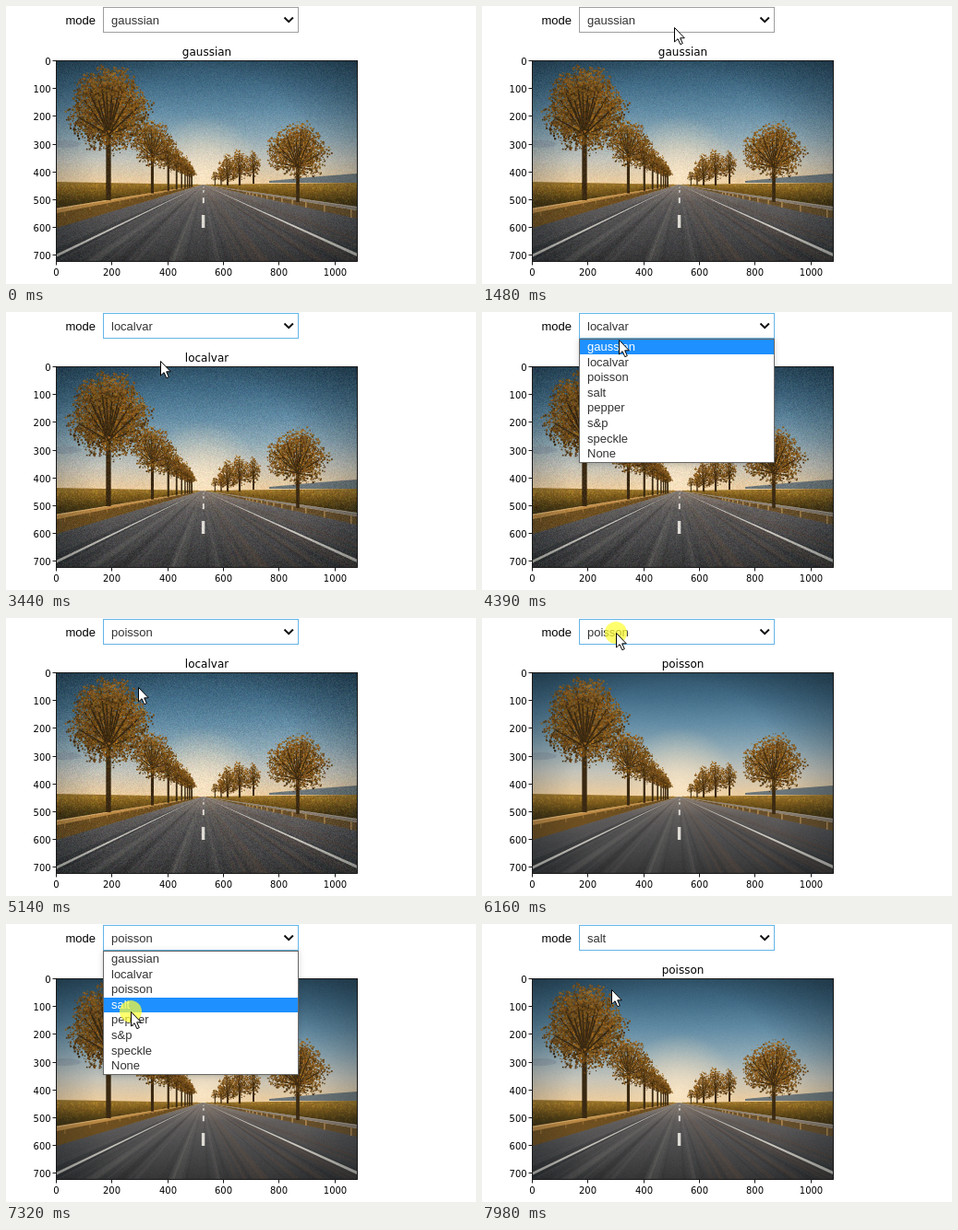
An HTML page with a canvas that plays this animation: 509 by 302 pixels, repeating every 8000 ms.

```html
<!DOCTYPE html>
<html lang="en">
<head>
<meta charset="utf-8">
<title>Noise mode</title>
<style>
html, body { margin: 0; width: 100%; height: 100%; overflow: hidden; background: #fff; }
canvas { position: absolute; left: 55px; top: 60px; visibility: hidden; }
svg { position: absolute; left: 0; top: 0; }
.ui { font: 13px "Liberation Sans", Arial, sans-serif; fill: #333; }
.label { fill: #000; }
.plot { font: 10px "DejaVu Sans", sans-serif; fill: #000; }
#title { font-size: 12px; text-anchor: middle; }
#menu { filter: drop-shadow(0 1px 3px rgba(0, 0, 0, .18)); }
</style>
</head>
<body>
<svg id="stage" width="509" height="302" viewBox="0 0 509 302">
  <text class="ui label" x="64.5" y="20">mode</text>
  <rect id="box" x="105.5" y="1.5" width="211" height="27" fill="#fff" stroke="#9e9e9e"/>
  <text id="value" class="ui" x="114" y="20"></text>
  <path d="M301.5 12.5l4.7 4.7 4.7-4.7" fill="none" stroke="#111" stroke-width="2"/>
  <g id="axes" class="plot">
    <rect x="54.5" y="59.5" width="326" height="218" fill="none" stroke="#000" stroke-width=".9"/>
    <text id="title" x="217.5" y="54"></text>
  </g>
  <g id="menu">
    <rect x="105.5" y="29.5" width="211" height="134" fill="#fff" stroke="#686868"/>
    <rect id="hot" x="106" width="210" height="16" fill="#1e90ff"/>
  </g>
  <circle id="halo" r="12" fill="#ffff30" fill-opacity=".7"/>
  <path id="cursor" d="M.5 .5V16l3.6-3.3 2.7 6 2.5-1.1-2.6-5.8h4.6z" fill="#fff" stroke="#000" stroke-width="1"/>
</svg>
<script>
const $ = id => document.getElementById(id);
const LOOP = 8000, STEP = 69, HOLD = 130;
const MODES = ['gaussian', 'localvar', 'poisson', 'salt', 'pepper', 's&p', 'speckle', 'None'];
const PRESSES = [1680, 2770, 4060, 5000, 6160, 7320]; // open, pick, open, pick ...
const REDRAWS = [3440, 5960];
// start, steps, x, y
const MOVES = [
  [70, 1, 411, 295], [490, 2, 409, 293], [1070, 7, 206, 20], [2140, 6, 167, 53],
  [3570, 4, 150, 7], [4390, 6, 143, 75], [5270, 9, 146, 20], [5960, 2, 145, 16],
  [6640, 6, 135, 95], [7910, 2, 140, 71]
];

function seeded(seed) {
  return () => {
    seed = (seed + 0x6D2B79F5) | 0;
    let v = Math.imul(seed ^ (seed >>> 15), 1 | seed);
    v ^= v + Math.imul(v ^ (v >>> 7), 61 | v);
    return ((v ^ (v >>> 14)) >>> 0) / 4294967296;
  };
}

// ---------- picture ----------
const L = 55, T = 60, W = 325, H = 217, R = L + W, B = T + H;
const VX = 213, VY = 194; // vanishing point

function newCanvas() {
  const c = document.createElement('canvas');
  c.width = W;
  c.height = H;
  return c;
}

function drawScene() {
  const c = newCanvas(), g = c.getContext('2d'), rnd = seeded(7);
  g.translate(-L, -T);

  const blend = (grad, ...stops) => {
    stops.forEach(([at, col]) => grad.addColorStop(at, col));
    return grad;
  };
  const down = (y1, y2, ...cols) =>
    blend(g.createLinearGradient(0, y1, 0, y2), ...cols.map((col, i) => [i / (cols.length - 1), col]));
  const glow = (r1, r2, from, to) =>
    blend(g.createRadialGradient(VX, VY - 10, r1, VX, VY - 10, r2), [0, from], [1, to]);
  // a wedge that opens from the vanishing point
  const fan = (fill, ...pts) => {
    g.fillStyle = fill;
    g.beginPath();
    g.moveTo(VX, VY);
    for (let i = 0; i < pts.length; i += 2) g.lineTo(pts[i], pts[i + 1]);
    g.fill();
  };

  // sky
  g.fillStyle = down(T, VY, '#2f5268', '#436d88', '#618ba4', '#8ca8b5', '#c4c3b9', '#efcd9c');
  g.fillRect(L, T, W, H);
  g.fillStyle = glow(2, 65, 'rgba(255,236,205,.75)', 'rgba(255,230,190,0)');
  g.fillRect(L, T, W, H);
  g.fillStyle = 'rgba(115,125,145,.3)';
  g.beginPath();
  g.ellipse(64, 150, 17, 4, 0, 0, 7);
  g.fill();

  // far hills and crops
  g.fillStyle = '#6c7679';
  g.beginPath();
  [[285, 190], [340, 185], [R, 182], [R, 192], [285, 192]].forEach(p => g.lineTo(...p));
  g.fill();
  const crops = down(190, 222, '#a07a30', '#7c5a1c', '#4a3a14', '#3b2d12');
  fan(crops, L, 191, L, 222);
  fan(crops, R, 192, R, 220);
  for (let i = 0; i < 900; i++) {
    const side = rnd() < .5 ? -1 : 1, d = Math.sqrt(rnd()), v = rnd();
    g.fillStyle = `hsla(${36 + rnd() * 10},60%,${40 - 26 * v + 10 * rnd()}%,.6)`;
    g.fillRect(VX + side * 165 * d, VY - 1 + 25 * d * v, 1 + rnd(), 1 + rnd());
  }

  // road with streaks along the lanes
  fan(down(VY, B, '#8d8178', '#605d5c', '#504f50', '#434344', '#363637'), L, 240, L, B, R, B, R, 230);
  for (let i = 0; i < 90; i++) {
    const x = L - 60 + rnd() * (W + 160), w = 2 + 7 * rnd();
    const warm = x > 240 ? '125,88,62' : '125,120,116';
    fan(`rgba(${rnd() < .5 ? warm : '30,31,34'},${.05 + .12 * rnd()})`, x, B, x + w, B);
  }
  fan('#6e4f20', L, 224, L, 241);
  fan('#69502b', R, 222, R, 231);
  fan('#c6c3bb', L, 269.5, L, 272.5);
  fan('#cbc7be', R, 268.5, R, 272);
  for (let s = 1; s > .05; s *= .43) {
    g.fillStyle = '#dedbd4';
    g.fillRect(VX + .5 - 1.6 * s, VY + 33 * s, 1 + 2.4 * s, 14 * s);
  }

  // guard rails
  for (let k = 0; k < 12; k++) {
    const s = 1 / (1 + k * .22);
    g.fillStyle = '#8f682f';
    g.fillRect(VX - 150 * s, VY + 25 * s, 1.5, 9 * s);
    g.fillStyle = '#b08a52';
    g.fillRect(VX + 160 * s, VY + 25 * s, 1.5, 11 * s);
  }
  fan('#b98743', L, 220, L, 225);
  fan('#dcae6c', L, 219.5, L, 221);
  fan('#877c70', R, 218, R, 222);
  fan('#aa9e90', R, 218, R, 219);

  // trees: seeded clumps of leaves, lit from above
  function tree(x, base, cy, rx, ry) {
    const size = Math.min(1, .5 + ry / 80), trunk = ry * .07;
    const branch = (w, x1, y1, x2, y2) => {
      g.strokeStyle = '#3a2912';
      g.lineWidth = w;
      g.beginPath();
      g.moveTo(x1, y1);
      g.lineTo(x2, y2);
      g.stroke();
    };
    branch(trunk * 1.5 + .5, x, cy, x, base);
    const clumps = 8 + ry * .6 | 0, leaves = rx * ry * 2.1 / clumps;
    for (let i = 0; i < clumps; i++) {
      const a = i * 2.4, d = Math.sqrt((i + .5) / clumps) * .82;
      const v = Math.sin(a) * d, px = x + Math.cos(a) * d * rx * (.9 + .25 * v), py = cy + v * ry;
      branch(trunk * .5, x, cy + ry * .6, px, py);
      for (let n = 0; n < leaves; n++) {
        const b = rnd() * 6.283, e = Math.sqrt(rnd()) * (.24 + .14 * rnd()), dy = Math.sin(b) * e;
        g.fillStyle = `hsl(${31 + rnd() * 7},${58 + rnd() * 14}%,${29 - dy * 18 - v * 3 + (rnd() - .5) * 20}%)`;
        const s = size * (.9 + rnd() * 1.3);
        g.fillRect(px + Math.cos(b) * e * rx - s / 2, py + dy * ry - s / 2, s, s);
      }
    }
  }
  for (let k = 9; k >= 0; k--) {
    const s = 1 / (1 + k * .87);
    tree(VX - 102 * s, VY + 1 + 16 * s, VY - 4 - 78 * s, 46 * s, 46 * s);
  }
  for (let k = 1; k < 4; k++) tree(VX + 40 / k, VY + 1, VY - 3 - 18 / k, 13 / k, 16 / k);
  tree(240, 195, 177, 12, 15);
  tree(268, 193, 172, 9, 14);
  tree(316, 213, 157, 35, 30);

  g.fillStyle = glow(115, 230, 'rgba(8,18,24,0)', 'rgba(8,18,24,.5)');
  g.fillRect(L, T, W, H);
  return c;
}

function addNoise(scene, sd, seed) {
  const c = newCanvas(), g = c.getContext('2d'), rnd = seeded(seed);
  g.drawImage(scene, 0, 0);
  const img = g.getImageData(0, 0, W, H), px = img.data;
  for (let i = 0; i < px.length; i += 4) {
    const grey = rnd() + rnd() + rnd() - 1.5;
    for (let k = 0; k < 3; k++) px[i + k] += sd * (grey + rnd() - .5);
  }
  g.putImageData(img, 0, 0);
  return c;
}

const scene = drawScene();
const plots = [9, 11, 3].map((sd, i) => {
  const c = addNoise(scene, sd, 20 + i);
  document.body.insertBefore(c, $('stage'));
  return c;
});

// ---------- static parts ----------
function add(parent, tag, attrs, text) {
  const el = document.createElementNS('http://www.w3.org/2000/svg', tag);
  for (const k in attrs) el.setAttribute(k, attrs[k]);
  if (text !== undefined) el.textContent = text;
  return $(parent).appendChild(el);
}
const SCALE = 326 / 1080;
const mark = d => add('axes', 'path', { d, stroke: '#000', 'stroke-width': .9 });
for (let v = 0; v <= 1000; v += 200) {
  const x = Math.round(54 + v * SCALE) + .5;
  mark(`M${x} 278v3.5`);
  add('axes', 'text', { x, y: 293, 'text-anchor': 'middle' }, v);
}
for (let v = 0; v <= 700; v += 100) {
  const y = Math.round(59 + v * SCALE) + .5;
  mark(`M54 ${y}h-3.5`);
  add('axes', 'text', { x: 48.7, y: y + 4, 'text-anchor': 'end' }, v);
}
const ROW = 16.6, rowTop = i => Math.round(30 + i * ROW);
const items = MODES.map((name, i) =>
  add('menu', 'text', { class: 'ui', x: 114, y: rowTop(i) + 12 }, name));

// ---------- animation ----------
const show = (el, on) => { el.style.visibility = on ? 'visible' : 'hidden'; };

function pointer(t) {
  let x = 411, y = 310;
  for (const [start, steps, tx, ty] of MOVES) {
    if (t < start) break;
    const k = Math.min(1, (Math.floor((t - start) / STEP) + 1) / steps);
    const e = 1 - Math.pow(1 - k, 2.3);
    x += (tx - x) * e;
    y += (ty - y) * e;
  }
  return [Math.round(x), Math.round(y)];
}

function render(t) {
  const [x, y] = pointer(t);
  const clicks = PRESSES.filter(p => t >= p + HOLD).length;
  const open = clicks % 2 === 1, value = clicks >> 1;
  const plot = REDRAWS.filter(r => t >= r).length;
  const hot = y > 29 ? Math.floor((y - 29.2) / ROW) : value;

  $('value').textContent = MODES[value];
  $('title').textContent = MODES[plot];
  plots.forEach((c, i) => show(c, i === plot));
  $('box').setAttribute('stroke', clicks ? '#64b5e8' : '#9e9e9e');

  show($('menu'), open);
  $('hot').setAttribute('y', rowTop(hot));
  items.forEach((el, i) => { el.style.fill = i === hot ? '#fff' : ''; });

  const at = `translate(${x} ${y})`;
  $('cursor').setAttribute('transform', at);
  $('halo').setAttribute('transform', at);
  show($('halo'), PRESSES.some(p => t >= p && t < p + HOLD));
}

let began;
function tick(now) {
  if (began === undefined) began = now;
  render((now - began) % LOOP);
  requestAnimationFrame(tick);
}
render(0);
requestAnimationFrame(tick);
</script>
</body>
</html>
```
